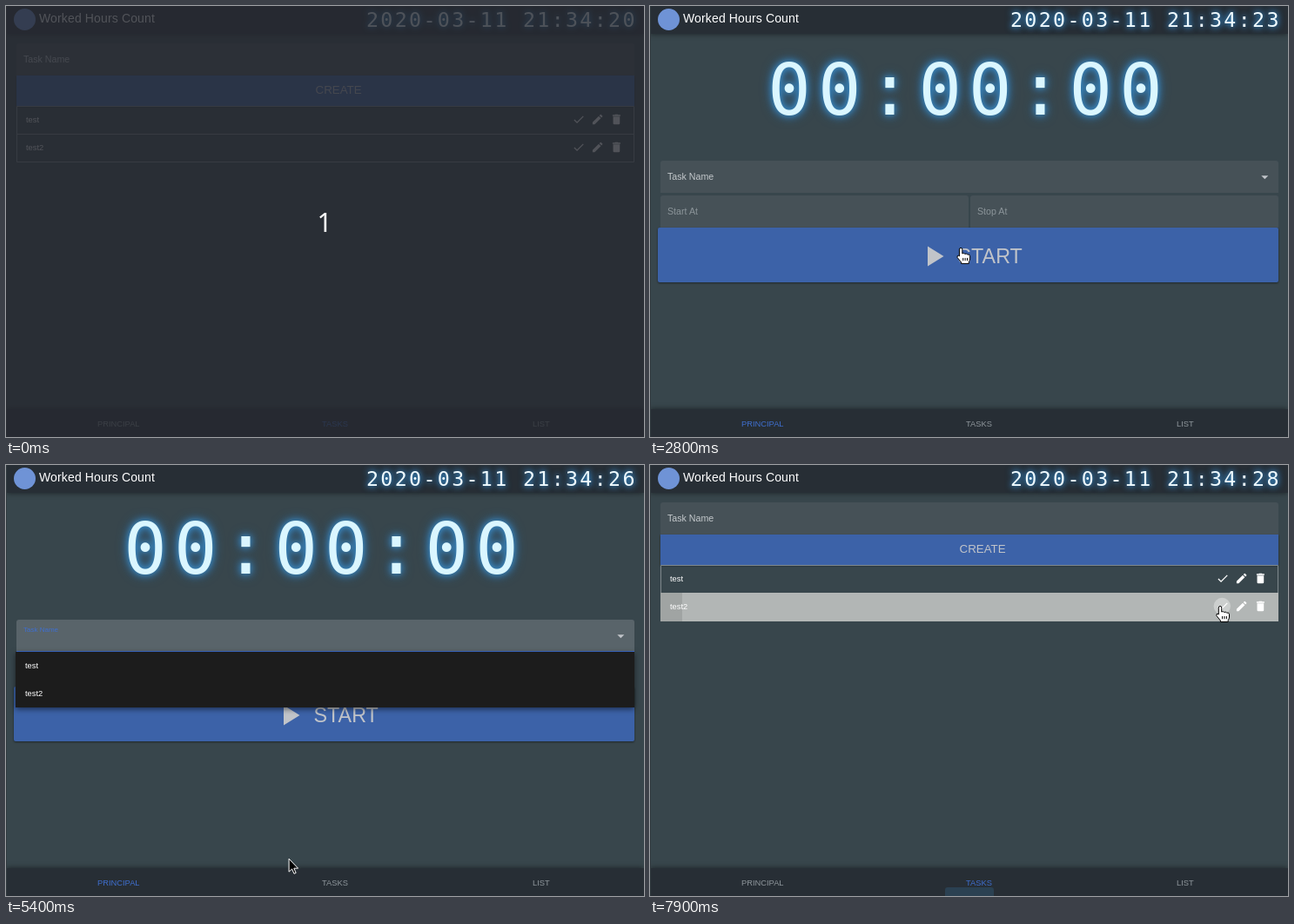
Recreate the animation shown at these times as an HTML page. Size 733x496 px, loop 8 s.

```html
<!DOCTYPE html>
<html lang="en">
<head>
<meta charset="utf-8">
<title>Worked Hours Count</title>
<style>
  html, body { margin: 0; width: 100%; height: 100%; overflow: hidden; background: #38464c; }
  svg { display: block; width: 733px; height: 496px; font-family: "Liberation Sans", Arial, sans-serif; fill: #fff; }
  text { white-space: pre; }
  .mono { font-family: "DejaVu Sans Mono", monospace; letter-spacing: .1em; }
  #clock { font-size: 23.3px; fill: #eefaff; text-shadow: 0 0 7px #3d9be0, 0 0 9px #2a6fa8; }
  #timer { font-size: 82.2px; fill: #daf6ff; text-shadow: 0 0 9px #3d9be0, 0 0 14px #2a6fa8; }
  .bar { fill: #272e35; filter: drop-shadow(0 0 3px #0008); }
  .field { fill: #465157; }
  .label { font-size: 10.67px; fill: #c4c9cc; }
  .dim { fill: #8c959a; }
  .button { fill: #3c62a8; filter: drop-shadow(0 1px 1px #0007); }
  .caption { fill: #c1c4c9; }
  .small, .tab { font-size: 9.33px; }
  .tab { fill: #8f979c; }
  .tab.active { fill: #3f6fcf; }
  .border { fill: none; stroke: #7f898d; }
</style>
</head>
<body>
<svg viewBox="0 0 733 496">
  <defs>
    <g id="icons">
      <path transform="translate(650.3 -7.7) scale(.64)" d="M9 16.2 4.8 12l-1.4 1.4L9 19 21 7l-1.4-1.4z"/>
      <path transform="translate(672 -7.7) scale(.64)" d="M3 17.25V21h3.75L17.8 9.95 14.05 6.2zM20.7 7.04a1 1 0 0 0 0-1.4L18.36 3.3a1 1 0 0 0-1.4 0l-1.84 1.83 3.75 3.75z"/>
      <path transform="translate(693.7 -7.7) scale(.64)" d="M6 19q0 2 2 2h8q2 0 2-2V7H6zM19 4h-3.5l-1-1h-5l-1 1H5v2h14z"/>
    </g>
    <clipPath id="tabClip"><rect id="tabClipBox" y="465" width="238" height="31"/></clipPath>
  </defs>

  <rect width="733" height="496" fill="#38464c"/>

  <g id="tasks">
    <path class="field" d="M12 80V46q0-3 3-3H719q3 0 3 3V80z"/>
    <text class="label" x="20" y="65">Task Name</text>
    <rect class="button" x="12" y="80" width="710" height="35"/>
    <text class="caption" x="355.5" y="101" font-size="13.33">CREATE</text>
    <path class="border" d="M12.5 115.5H721.5V179.5H12.5zM12 147.5H722"/>
    <g id="rowHover">
      <rect x="12" y="147" width="710" height="33" fill="#b2b6b5"/>
      <rect id="progress" x="12" y="147" height="33" fill="#a0a4a3"/>
      <circle cx="657.3" cy="162.5" r="9.7" fill="#cccfce"/>
    </g>
    <text class="small" x="23" y="134">test</text>
    <text class="small" x="23" y="166">test2</text>
    <use href="#icons" y="130.5"/>
    <use href="#icons" y="162.5"/>
  </g>

  <g id="principal">
    <text class="mono" id="timer" x="135.3" y="125">00:00:00</text>
    <path class="field" id="select" d="M12 215V181q0-3 3-3H719q3 0 3 3V215z"/>
    <rect id="underline" x="12" y="214" width="710" height="1.3" fill="#3f6fcf"/>
    <text class="label" id="selectLabel">Task Name</text>
    <path class="caption" d="M702.3 195.2h8l-4 4z"/>
    <path class="field" d="M12 255V221q0-3 3-3H363q3 0 3 3V255zM368 255V221q0-3 3-3H719q3 0 3 3V255z"/>
    <text class="label dim" x="20" y="240">Start At</text>
    <text class="label dim" x="376" y="240">Stop At</text>
    <rect class="button" x="9" y="255" width="713" height="63" rx="2"/>
    <path class="caption" d="M319 276.5 337.5 288 319 299.5z"/>
    <text class="caption" x="353.5" y="296" font-size="23.33">START</text>
  </g>

  <g id="menu">
    <rect x="11" y="215" width="711" height="64" fill="#1c1c1c" style="filter:drop-shadow(0 2px 3px #0008)"/>
    <rect id="itemHover" x="11" width="711" height="32" fill="#4a4a4a"/>
    <text class="small" x="22" y="234">test</text>
    <text class="small" x="22" y="266">test2</text>
  </g>

  <rect class="bar" width="733" height="32"/>
  <circle cx="21.5" cy="15.5" r="12.5" fill="#6f93d6"/>
  <text x="38" y="19" font-size="14" letter-spacing=".14">Worked Hours Count</text>
  <text class="mono" id="clock" x="414" y="24"></text>

  <rect class="bar" y="464" width="733" height="32"/>
  <rect id="tabHover" y="465" width="238" height="31" fill="#fff" fill-opacity=".1"/>
  <circle id="ripple" cy="486" fill="#3077a8" clip-path="url(#tabClip)"/>
  <text class="tab" x="105" y="484">PRINCIPAL</text>
  <text class="tab" x="363" y="484">TASKS</text>
  <text class="tab" x="605" y="484">LIST</text>
  <rect id="toast" x="339" width="56" height="24" rx="3" fill="#2b4152"/>
  <rect width="1" height="496" fill="#30393e"/>

  <g id="status">
    <path id="statusBox" fill="#f3f3f1"/>
    <text id="url" x="6" y="491" font-size="14.9" fill="#555" style="font-family:'Open Sans',sans-serif"></text>
  </g>

  <g id="cursor" stroke="#000" stroke-linejoin="round">
    <g id="hand">
      <path d="M-1.7 9V1.2a1.7 1.7 0 0 1 3.4 0V6q1.7-1 3 .4 1.8-.7 2.9.6 2.9-.4 2.9 1.8V12q0 2-1.3 3.5v2H.4V16L-4 10.6Q-4.6 8-2.8 8.2z"/>
      <path fill="none" d="M2.6 11v3.2M5 11v3.2M7.4 11v3.2"/>
    </g>
    <path id="arrow" fill="#000" stroke="#fff" d="M0 0V15l3.5-3.2 2.4 5.4 2.2-1-2.4-5.2H10.500z"/>
  </g>

  <g id="countdown">
    <rect width="733" height="496" fill="#262830" fill-opacity=".8"/>
    <text x="366" y="259.500" font-size="30" text-anchor="middle" style="font-family:'Noto Sans',sans-serif">1</text>
  </g>
</svg>

<script>
const LOOP = 8000;
const el = {};
document.querySelectorAll('[id]').forEach(e => el[e.id] = e);
const tabs = document.querySelectorAll('.tab');

// time, x, y of the pointer tip
const path = [
  [500, 470, 60], [1250, 158, 478], [1400, 169, 479], [2450, 169, 479],
  [3000, 437, 194], [3450, 437, 194], [3900, 150, 274], [4150, 150, 274],
  [4500, 128, 281], [4800, 118, 253], [4900, 118, 253], [5550, 357, 484],
  [6600, 357, 484], [7400, 652, 186], [7550, 652, 186], [7700, 655, 163], [LOOP, 655, 163]
];

const ramp = (t, a, b) => Math.min(1, Math.max(0, (t - a) / (b - a)));
const ease = p => p * p * (3 - 2 * p);
const within = (t, a, b) => t >= a && t < b;
const show = (e, on) => e.style.display = on ? '' : 'none';
const set = (e, attrs) => { for (const k in attrs) e.setAttribute(k, attrs[k]); };

function pointerAt(t) {
  const i = Math.max(1, path.findIndex(p => p[0] > t));
  const [t0, x0, y0] = path[i - 1], [t1, x1, y1] = path[i];
  const p = ease(ramp(t, t0, t1));
  return [x0 + (x1 - x0) * p, y0 + (y1 - y0) * p];
}

function drawRipple(t) {
  const first = t < 5000, age = t - (first ? 1900 : 5850);
  const left = first ? 21 : 259;
  show(el.ripple, within(age, 0, 600));
  set(el.tabClipBox, { x: left });
  set(el.ripple, {
    cx: first ? 169 : 361.5,
    r: Math.min(140, Math.max(0, age * 41 / 150)),
    opacity: .34 * (1 - ramp(age, 250, 600))
  });
}

function drawPointer(t, onPrincipal, menuOpen) {
  const [x, y] = pointerAt(t), visible = t >= 500;
  const onTab = visible && y > 465;
  const onItem = menuOpen && y > 215 && y < 279;
  const onLink = onTab || onItem || (onPrincipal ? y > 178 && y < 318 : within(y, 147, 180));
  show(el.cursor, visible);
  set(el.cursor, { transform: `translate(${x} ${y})` });
  show(el.hand, onLink);
  show(el.arrow, !onLink);
  show(el.tabHover, onTab);
  set(el.tabHover, x < 259 ? { x: 1, width: 258 } : { x: 259, width: 238 });
  show(el.itemHover, onItem);
  set(el.itemHover, { y: y < 247 ? 215 : 247 });
}

function render(t) {
  const onPrincipal = within(t, 1800, 5800);
  const second = t < 200 ? 20 : 21 + Math.floor((t - 200) / 1000);
  el.clock.textContent = '2020-03-11 21:34:' + second;
  show(el.countdown, t < 200);
  show(el.principal, onPrincipal);
  show(el.tasks, !onPrincipal);

  const active = within(t, 2000, 5850) ? 0 : 1;
  tabs.forEach((tab, i) => tab.classList.toggle('active', i === active));

  // drop-down
  const focused = t >= 3050, float = ease(ramp(t, 3050, 3300));
  el.select.style.fill = focused ? '#59646a' : '';
  show(el.underline, focused);
  set(el.selectLabel, { x: 20, y: 200 - 8 * float });
  el.selectLabel.style.fontSize = 10.67 - 2.67 * float + 'px';
  el.selectLabel.style.fill = focused ? '#3f6fcf' : '';
  const menuOpacity = ramp(t, 3050, 3312) * (1 - ramp(t, 5750, 6013));
  show(el.menu, menuOpacity > 0);
  set(el.menu, { opacity: menuOpacity });

  // address preview
  const toTasks = t > 5000;
  show(el.status, within(t, 1200, 2500) || within(t, 5700, 6700));
  el.url.textContent = 'localhost:8080/#/' + (toTasks ? 'tasks' : '');
  set(el.statusBox, { d: `M0 475H${toTasks ? 166 : 130}q3 0 3 3V496H0z` });

  // finishing the second task
  set(el.rowHover, { opacity: ramp(t, 7580, 7800) });
  set(el.progress, { width: 25 * ramp(t, 7750, 7900) });
  set(el.toast, { y: 496 - 10 * ramp(t, 7800, 7900) });

  drawRipple(t);
  drawPointer(t, onPrincipal, menuOpacity > 0 && t < 5750);
}

const start = performance.now();
function tick() {
  render((performance.now() - start) % LOOP);
  requestAnimationFrame(tick);
}
tick();
</script>
</body>
</html>
```
